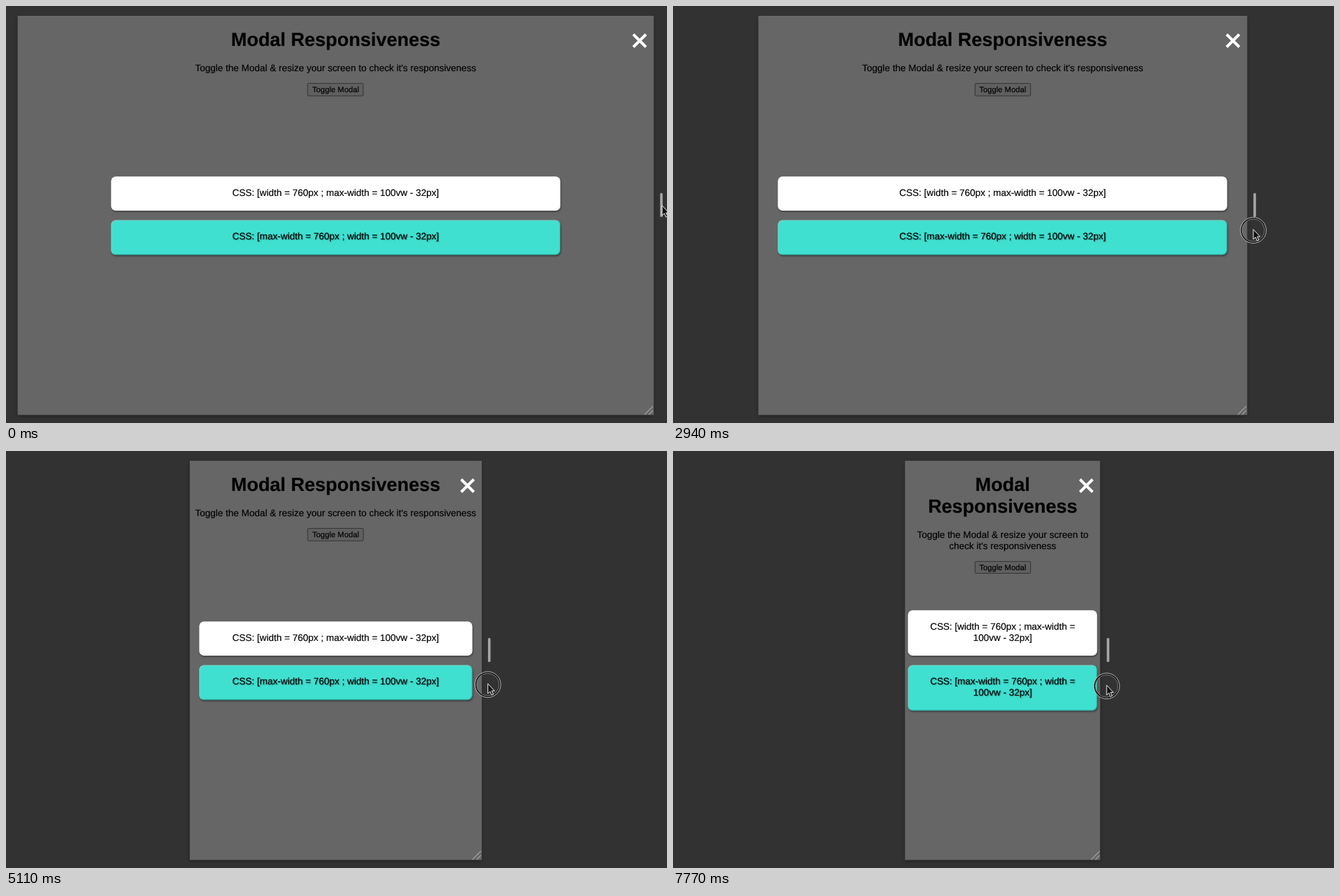
Write an HTML page that moves like this. It is 942 by 595 pixels and loops after 8 s.

```html
<!DOCTYPE html>
<html lang="en">
<head>
<meta charset="utf-8">
<title>Modal Responsiveness</title>
<style>
  html, body { margin: 0; width: 100%; height: 100%; overflow: hidden; background: #323232; }
  #stage { position: relative; width: 942px; height: 595px; overflow: hidden; background: #323232; }
  /* The page is laid out at its own size and shown zoomed out. */
  #page {
    position: absolute; left: 0; top: 0; height: 676px; overflow: hidden;
    transform-origin: 0 0; background: #666; color: #000;
    box-shadow: 0 3px 6px rgba(0, 0, 0, .3);
    font: 16px/18.5px "Liberation Sans", Arial, sans-serif;
    text-align: center; text-rendering: geometricPrecision;
    -webkit-text-stroke: .2px #000;
  }
  .content { padding: 0 8px; }
  h1 { margin: 21.9px 0 21.9px; font-size: 32px; line-height: 37px; }
  p { margin: 0 0 15px; }
  .button {
    display: inline-block; box-sizing: border-box; width: 95px; height: 21.5px;
    border: 1px solid #2c2c2c; border-radius: 2px; background: #606060;
    font-size: 13.333px; line-height: 19.5px; white-space: nowrap;
  }
  .card {
    position: absolute; left: 0; right: 0; margin: auto; box-sizing: border-box;
    width: calc(100% - 32px); min-width: 320px; max-width: 760px;
    padding: 20px 18px; border-radius: 8px; background: #fff;
    box-shadow: 1px 2px 3px rgba(0, 0, 0, .35);
  }
  .upper { bottom: 346px; }
  .lower {
    top: 346px; background: #40e0d0;
    box-shadow: 1px 2px 3px rgba(0, 0, 0, .45),
      inset 1px 1px 1px rgba(190, 190, 180, .7), inset -1px -1px 1px rgba(20, 110, 100, .5);
    text-shadow: 1px 1px 2px rgba(0, 0, 0, .35);
  }
  svg { position: absolute; left: 0; top: 0; }
</style>
</head>
<body>
<div id="stage">
  <div id="page">
    <div class="content">
      <h1>Modal Responsiveness</h1>
      <p>Toggle the Modal &amp; resize your screen to check it's responsiveness</p>
      <span class="button">Toggle Modal</span>
    </div>
    <div class="card upper">CSS: [width = 760px ; max-width = 100vw - 32px]</div>
    <div class="card lower">CSS: [max-width = 760px ; width = 100vw - 32px]</div>
  </div>
  <svg width="942" height="595" viewBox="0 0 942 595" fill="none">
    <g id="edge">
      <path d="M-29 40.5l18 18m0-18l-18 18" stroke="#fff" stroke-width="3.9"/>
      <path d="M-13 583L-1 571M-7 583L-1 577" stroke="#a0a0a0" stroke-width="1.2"/>
      <path d="M11 268.5V299.5" stroke="#a6a6a6" stroke-width="3.6" stroke-linecap="round"/>
    </g>
    <g id="pointer">
      <g id="ring">
        <circle r="17.2" stroke="#151515" stroke-width="2"/>
        <circle r="18.4" stroke="#c4c4c4" stroke-width=".9"/>
        <circle r="16" stroke="#999" stroke-width=".7"/>
      </g>
      <path d="M0 -1.3V12.9L3.2 9.9L5.5 15.1L7.8 14.1L5.6 9.1H9.6Z" fill="#111" stroke="#eee" stroke-width="1"/>
    </g>
  </svg>
</div>
<script>
  const LOOP = 8000, STEP = 70, PRESS = 630;
  const CENTRE = 469.8, TOP = 14, ZOOM = .8425;
  const REST = { x: 935, y: 286 };   // pointer before the drag
  const DROP = 51.5, REACH = 100;    // how far the drag sinks, and over what distance
  const GRAB = 9;                    // pointer's lead over the page edge

  // [time, right edge of the page] where the drag changes pace
  const drag = [
    [910, 923], [1470, 913], [1890, 882.5], [2590, 834], [2940, 818],
    [3710, 765], [5110, 677.7], [5950, 641], [6650, 629], [7490, 610], [7770, 609]
  ];

  const $ = id => document.getElementById(id);
  const page = $("page"), edge = $("edge"), pointer = $("pointer"), ring = $("ring");

  function edgeAt(t) {
    const i = drag.findIndex(([time]) => time > t);
    if (i === 0) return drag[0][1];
    if (i < 0) return drag[drag.length - 1][1];
    const [t0, x0] = drag[i - 1], [t1, x1] = drag[i];
    return x0 + (x1 - x0) * (t - t0) / (t1 - t0);
  }

  function place(node, x, y) {
    node.setAttribute("transform", `translate(${x} ${y})`);
  }

  function draw(time) {
    const t = Math.floor(time % LOOP / STEP) * STEP;
    const right = edgeAt(t);
    const width = 2 * (right - CENTRE);
    const x = Math.min(REST.x, right + GRAB + 3 * Math.max(0, 1 - Math.abs(right - 923) / 20));
    const y = REST.y + DROP * (1 - Math.exp((x - REST.x) / REACH));

    page.style.width = width / ZOOM + "px";
    page.style.transform = `translate(${CENTRE - width / 2}px, ${TOP}px) scale(${ZOOM})`;
    place(edge, right, 0);
    place(pointer, x, y);
    ring.setAttribute("visibility", t < PRESS ? "hidden" : "visible");
  }

  const start = performance.now();
  function tick() {
    draw(performance.now() - start);
    requestAnimationFrame(tick);
  }
  tick();
</script>
</body>
</html>
```
